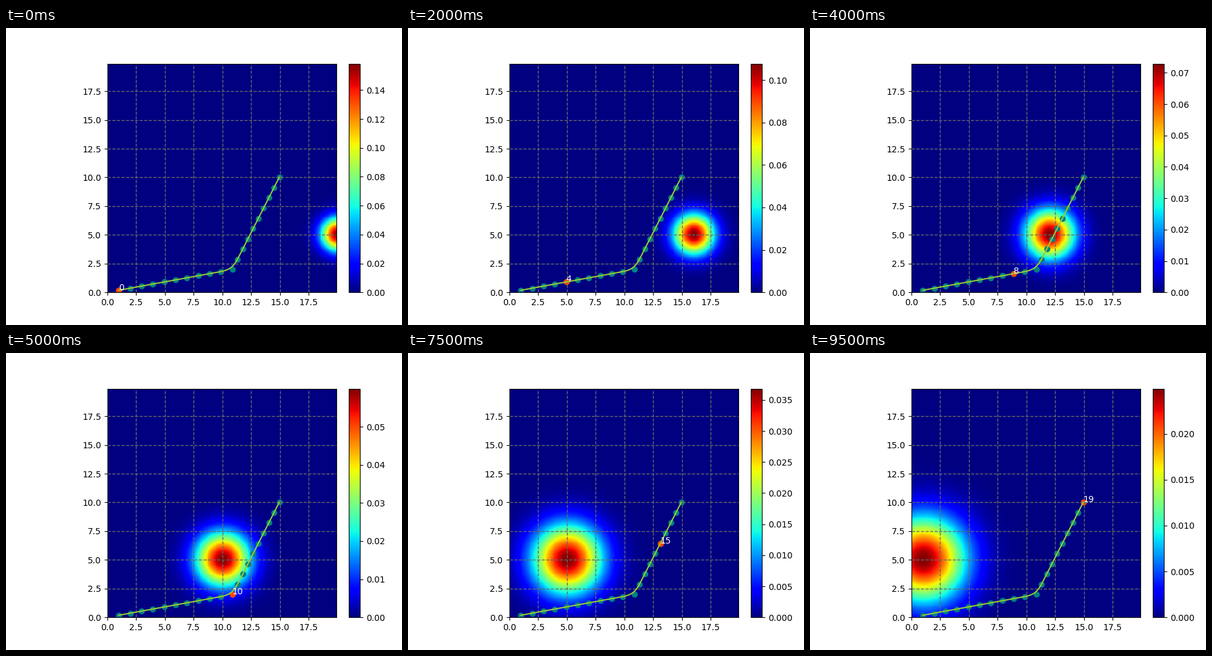
These frames come from a looping animation (640 px wide and 480 px high, 10 s). A matplotlib script:

```python
import numpy as np
import matplotlib.pyplot as plt
from matplotlib.animation import FuncAnimation

W, H, DPI = 640, 480, 100
STEPS = 20
CORNER_STEP = 11
GRID = np.arange(200) * 0.1
GX, GY = np.meshgrid(GRID, GRID)

# Two straight legs walked at constant speed.
CORNER = np.array([10.86, 1.98])
GOAL = np.array([14.95, 10.01])
FIRST_LEG = CORNER / CORNER_STEP
SECOND_LEG = (GOAL - CORNER) / (STEPS - CORNER_STEP)


def position(step):
    """Points on the two-leg route, extended straight beyond its ends."""
    offset = np.asarray(step, float)[:, None] - CORNER_STEP
    return CORNER + np.minimum(offset, 0) * FIRST_LEG + np.maximum(offset, 0) * SECOND_LEG


def smooth_route(degree=5, samples=41):
    """Uniform B-spline of the route: repeated box averaging over one step."""
    half = samples // 2
    margin = half * (degree - 1)
    index = np.arange(-margin, (STEPS - 1) * samples + margin + 1)
    route = position(1 + index / samples)
    box = np.ones(samples) / samples
    for _ in range(degree - 1):
        route = np.column_stack([np.convolve(c, box, "valid") for c in route.T])
    return route


def density(step):
    sigma = 1.05 ** step
    r2 = (GX - (20 - step)) ** 2 + (GY - 5) ** 2
    return np.exp(-r2 / (2 * sigma ** 2)) / (2 * np.pi * sigma ** 2)


def pixel_axes(left, bottom, width, height):
    return fig.add_axes([left / W, bottom / H, width / W, height / H])


fig = plt.figure(figsize=(W / DPI, H / DPI), dpi=DPI)
SIDE = 369.6
ax = pixel_axes(163.96, 52.8, SIDE, SIDE)
cax = pixel_axes(163.96 + SIDE + 20, 52.8, SIDE / 20, SIDE)

mesh = ax.pcolormesh(GRID, GRID, density(0)[:-1, :-1], cmap="jet")
fig.colorbar(mesh, cax=cax)

stops = position(np.arange(1, STEPS + 1))
ax.scatter(*stops.T, color="teal")
marker = ax.scatter(*stops[:1].T, color="orangered")
ax.plot(*smooth_route().T, color="yellowgreen", lw=1.5)
label = ax.text(0, 0, "", color="white", fontsize=10)

ax.grid(True, color="dimgray", linestyle="--", linewidth=1)
ax.set_xlim(0, GRID[-1])
ax.set_ylim(0, GRID[-1])


def update(step):
    field = density(step)
    mesh.set_array(field[:-1, :-1])
    mesh.set_clim(field.min(), field.max())
    marker.set_offsets(stops[step:step + 1])
    label.set_position(stops[step])
    label.set_text(str(step))
    return mesh, marker, label


anim = FuncAnimation(fig, update, frames=STEPS, interval=500, repeat=True)
plt.show()
```
